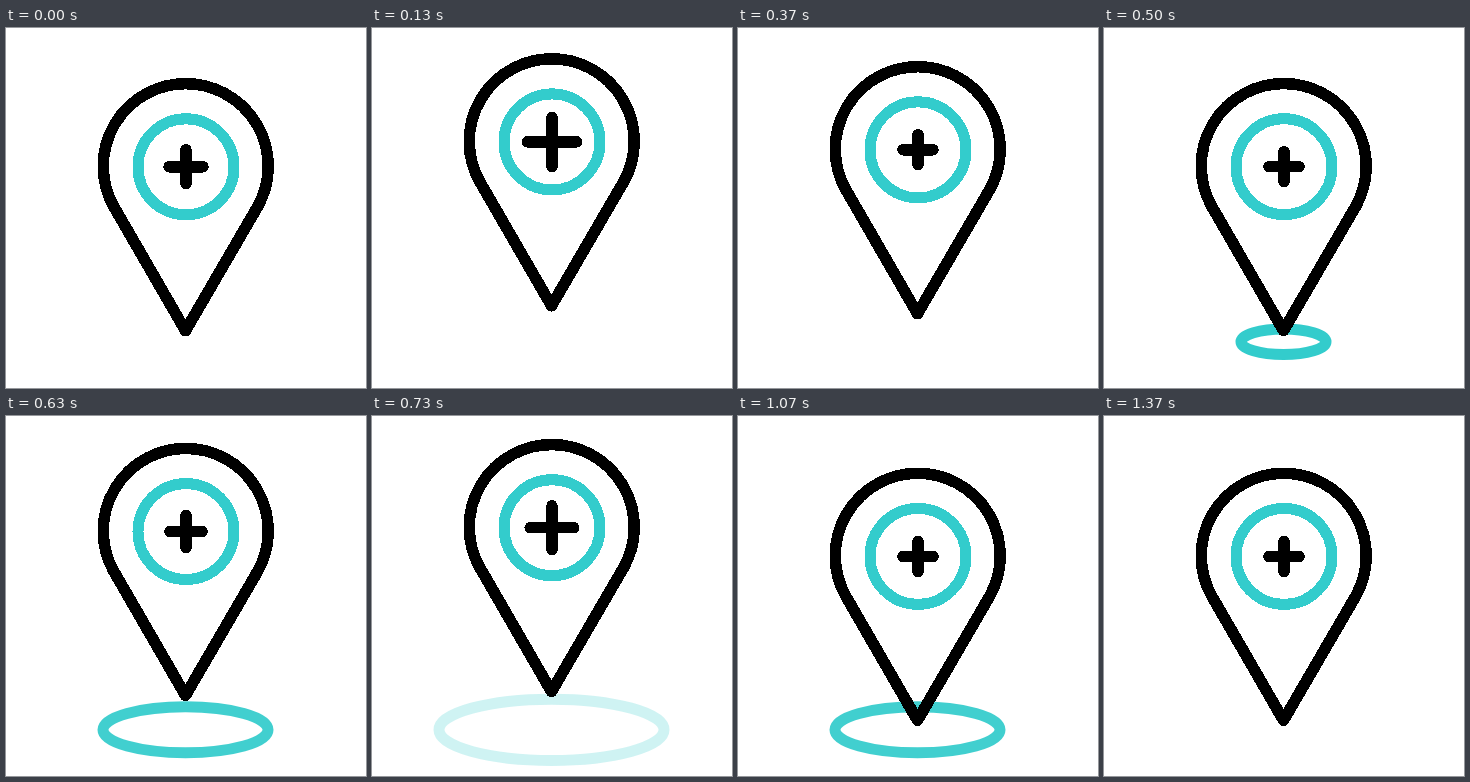
Animation, 360 px wide and 360 px high, one loop 1.67 s. Source, as an HTML page:

```html
<!DOCTYPE html>
<html lang="en">
<head>
<meta charset="utf-8">
<title>Bouncing map pin</title>
<style>
  html, body { margin: 0; width: 100%; height: 100%; overflow: hidden; background: #fff; }
  svg { display: block; width: 100%; height: 100%; }
  svg * { fill: none; stroke-width: 11.5; stroke-linecap: round; stroke-linejoin: round; }
  .teal { stroke: #33cccc; stroke-width: 11; }
  .ink { stroke: #000; }
  #pin * { shape-rendering: crispEdges; }
</style>
</head>
<body>
<svg viewBox="0 0 360 360">
  <ellipse class="teal" cx="179.5" cy="313.8"/>
  <ellipse class="teal" cx="179.5" cy="313.8"/>
  <g id="pin">
    <path class="ink" d="M179.5 304.3 L107.6 179.8 A82.5 82.5 0 1 1 251.9 179.8 Z"/>
    <circle class="teal" cx="180" cy="140.4" r="48"/>
    <path class="ink" id="plus"/>
  </g>
</svg>
<script>
const LOOP = 1670;
const STEP = LOOP / 50;
const CX = 180, CY = 140.4;

// Tables of [step, value]
const LIFT = [[0, 0], [8.5, -42], [15, 0], [22, -31], [28, 0]];
const ARM = [[0, 15], [6, 26.6], [12, 15], [19.5, 15], [25.5, 26.6], [31.5, 15]];
const FADE = [[0, 0], [4, 1], [7.7, 1], [12, 0]];
const RIPPLE_STARTS = [12, 25];

const pin = document.getElementById('pin');
const plus = document.getElementById('plus');
const ripples = document.querySelectorAll('ellipse');

const linear = u => u;
const smooth = u => u * u * (3 - 2 * u);

function sample(keys, s, ease) {
  if (s <= keys[0][0]) return keys[0][1];
  for (let i = 1; i < keys.length; i++) {
    const [s0, v0] = keys[i - 1];
    const [s1, v1] = keys[i];
    if (s < s1) return v0 + (v1 - v0) * ease((s - s0) / (s1 - s0));
  }
  return keys[keys.length - 1][1];
}

function draw(time) {
  // The motion advances in 50 discrete steps per loop
  const s = Math.floor((time % LOOP + 7) / STEP) % 50 + 1;

  pin.setAttribute('transform', `translate(0 ${sample(LIFT, s, smooth)})`);

  const a = sample(ARM, s, linear);
  plus.setAttribute('d', `M${CX - a} ${CY}H${CX + a}M${CX} ${CY - a}V${CY + a}`);

  ripples.forEach((el, i) => {
    const age = Math.max(0, s - RIPPLE_STARTS[i]);
    el.setAttribute('rx', 2.5 + 10 * age);
    el.setAttribute('ry', 2.6 + 2.55 * age);
    el.setAttribute('opacity', sample(FADE, age, linear));
  });
}

const start = performance.now();
function tick() {
  draw(performance.now() - start);
  requestAnimationFrame(tick);
}
tick();
</script>
</body>
</html>
```
